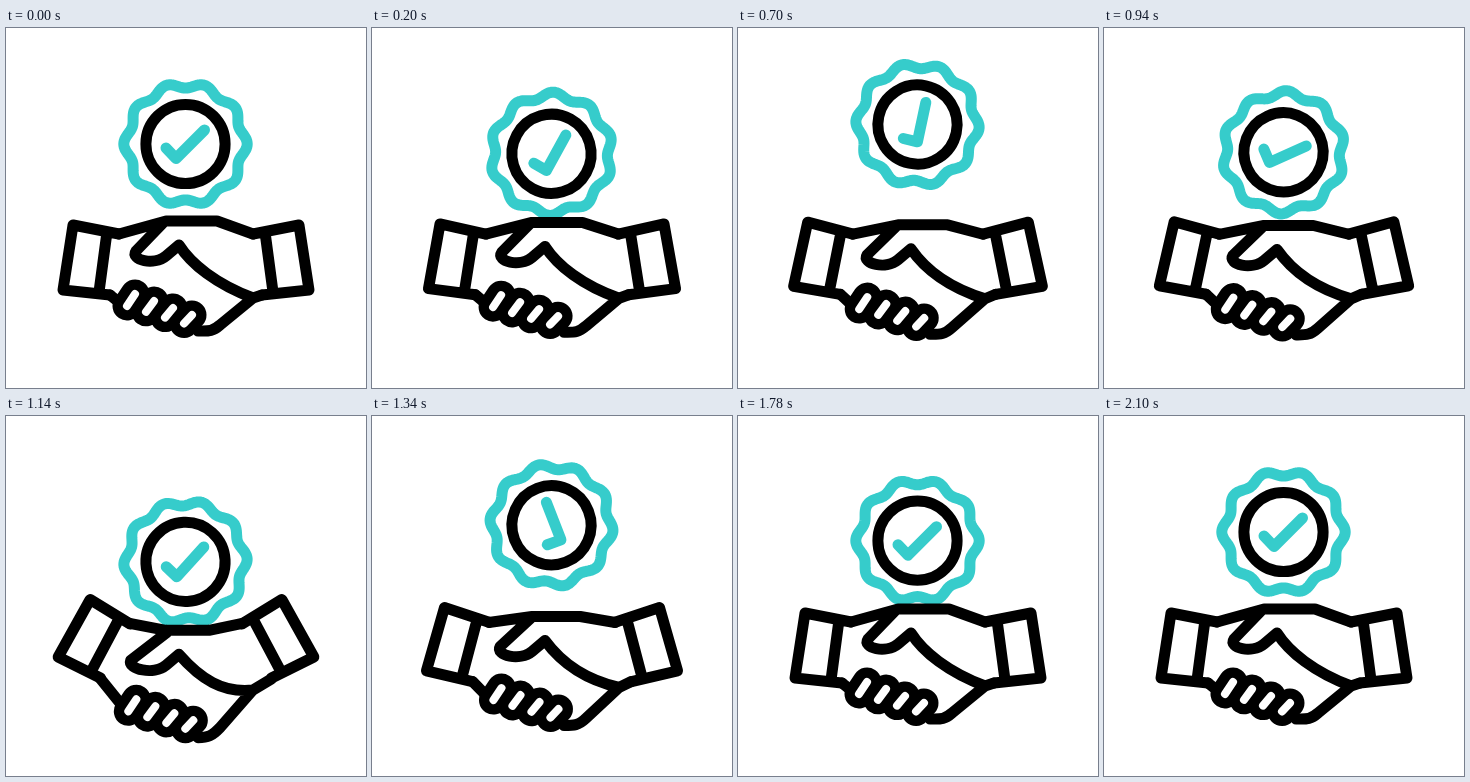
These frames come from a looping animation (360 by 360 pixels, 2400 ms). An HTML page:

```html
<!DOCTYPE html>
<html lang="en">
<head>
<meta charset="utf-8">
<title>Handshake badge</title>
<style>
html, body { margin: 0; height: 100%; overflow: hidden; background: #fff; }
svg { display: block; width: 100vw; height: 100vh; }
path, circle { fill: none; stroke: #000; stroke-width: 11; stroke-linecap: round; stroke-linejoin: round; }
.teal { stroke: #36cccb; }
.finger { stroke-width: 29; }
.slit { stroke: #fff; stroke-width: 8; }
</style>
</head>
<body>
<svg viewBox="0 0 360 360">
  <g id="badge">
    <path id="rosette" class="teal"/>
    <circle r="39.6"/>
    <path class="teal" d="M-19.5 4-9.5 14.5 19-14"/>
  </g>
  <path id="cuff" d="M113 206 67 197 57 262 104 267M101 204 93 264"/>
  <use href="#cuff" transform="matrix(-1 0 0 1 360 0)"/>
  <path id="palm"/>
  <g id="fingers">
    <path class="finger"/>
    <path class="slit"/>
  </g>
</svg>
<script>
const $ = id => document.getElementById(id);
const set = (id, name, value) => $(id).setAttribute(name, value);
const LOOP = 2400, STEP = 20;

// Turning points of the badge: [time, value]
const height = [[0, 116], [490, 143.5], [715, 96], [1130, 146], [1410, 103], [1810, 125], [2100, 116]];
const turn = [[0, 0], [540, -54], [1000, 24], [1390, -70], [1780, 0]];

// Cosine swing from one turning point to the next
function swing(keys, t) {
  const i = keys.findIndex(k => k[0] > t);
  if (i < 0) return keys.at(-1)[1];
  const [t0, v0] = keys[i - 1], [t1, v1] = keys[i];
  return v0 + (v1 - v0) * (1 - Math.cos(Math.PI * (t - t0) / (t1 - t0))) / 2;
}

// The hands give way around each of the two landings.
const pulse = (t, peak) => Math.exp(-(((t - peak) / 175) ** 2));
const press = t => 1.15 * pulse(t, 480) + 1.35 * pulse(t, 1160);

// Palm outline: the middle drops while the wrists keep joined to the cuffs.
function palm(s) {
  const drop = 16 * s, top = 193 + drop, knuckle = 270 + 3 * s;
  const wristX = 113 + 8 * s, wristY = 206 + s;
  const heelX = 104 - 7 * s, heelY = 267 - 3 * s;
  return `M${heelX} ${heelY}L114 ${275 + 9 * s}
    M${wristX} ${wristY}L160 ${top} ${211 - 6 * s} ${top} ${360 - wristX} ${wristY}
    M${360 - heelX} ${heelY}L247 ${knuckle} 214 ${297 + 11 * s}
    C206 ${304 + 12 * s} 202 ${303 + 14 * s} 192 ${303 + 14 * s}
    M${157 + 3 * s} ${top + 2}L${130 - 4 * s} ${223 + drop}
    C${124 - 2 * s} ${232 + drop} 148 ${238 + drop} 160 ${228 + drop}L173 ${217 + drop}
    C${185 + 7 * s} ${236 + 20 * s} ${210 + 5 * s} ${256 + drop} 247 ${knuckle}`;
}

// Ten soft lobes
let ring = [];
for (let a = 0; a < 2 * Math.PI; a += Math.PI / 120) {
  const r = 58.8 + 2.9 * Math.cos(10 * a);
  ring.push(`${r * Math.cos(a)} ${r * Math.sin(a)}`);
}
set('rosette', 'd', `M${ring.join('L')}Z`);

let slits = '';
for (let i = 0; i < 4; i++)
  slits += `M${121 + 19 * i} ${278 + 5.8 * i}L${129 + 19 * i} ${266 + 7 * i}`;
for (const p of $('fingers').children) p.setAttribute('d', slits);

function draw(now) {
  const t = Math.floor(now % LOOP / STEP) * STEP;
  const s = press(t);
  set('badge', 'transform', `translate(179.5 ${swing(height, t)}) rotate(${swing(turn, t)})`);
  set('cuff', 'transform', `rotate(${15.3 * s} 113 238)`);
  set('palm', 'd', palm(s));
  set('fingers', 'transform', `translate(${s} ${13 * s})`);
}

const start = performance.now();
(function tick() {
  draw(performance.now() - start);
  requestAnimationFrame(tick);
})();
</script>
</body>
</html>
```
